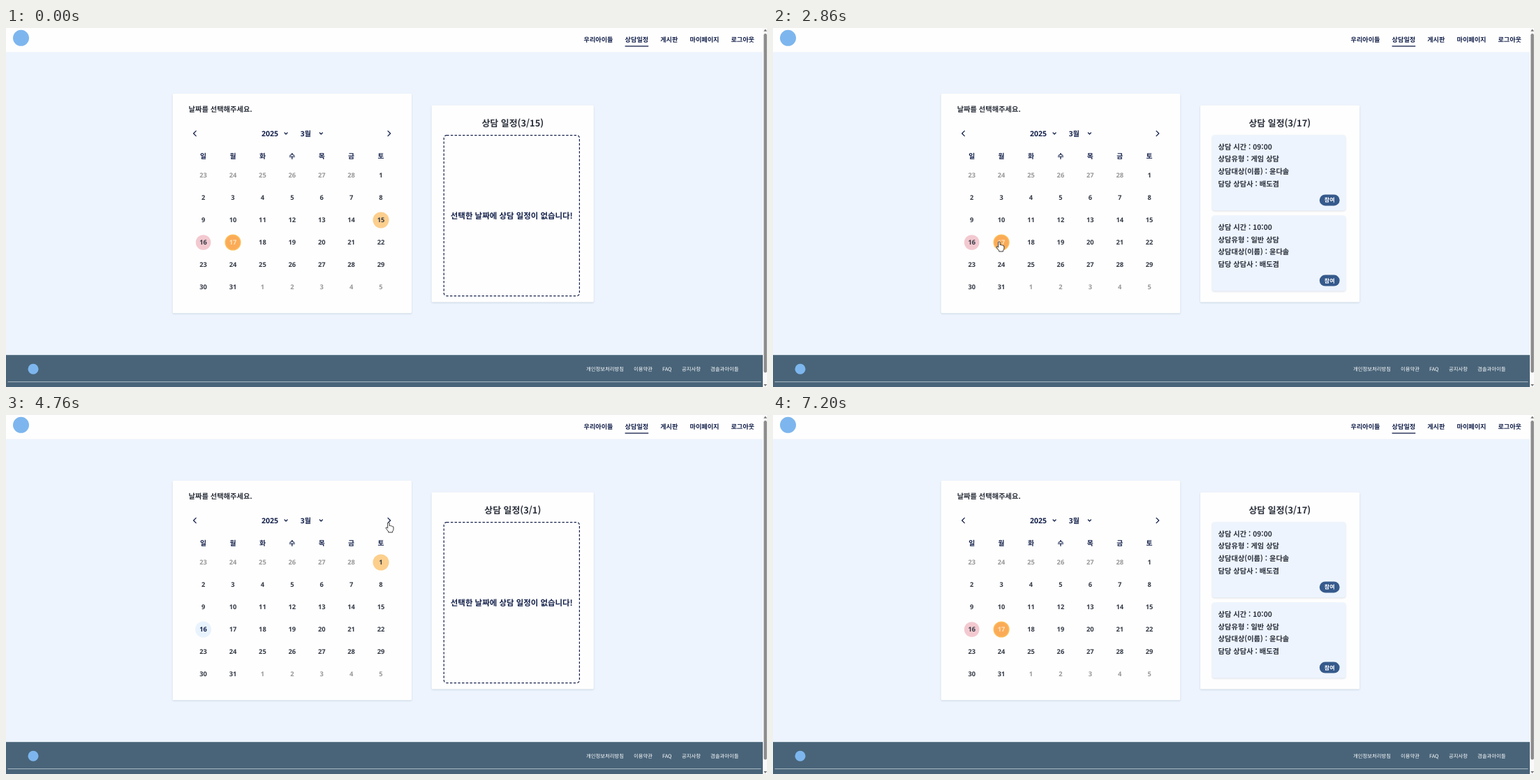
An HTML page for the animation above (7.67 s loop, 1090 by 514 pixels).

```html
<!DOCTYPE html>
<html lang="ko">
<head>
<meta charset="utf-8">
<title>상담 일정</title>
<style>
  html, body { margin: 0; width: 100%; height: 100%; overflow: hidden; background: #edf4fd; }
  svg { display: block; width: 1090px; height: 514px; }
  text { font-family: "Noto Sans CJK KR", "Noto Sans CJK", "Noto Sans", sans-serif; font-weight: 600; text-rendering: geometricPrecision; white-space: pre; }
  .num { font-family: "Noto Sans", "Noto Sans CJK KR", "Noto Sans CJK", sans-serif; font-weight: 700; }
  .thin { font-weight: 500; }
  .card { fill: #fefefe; filter: drop-shadow(0 1px 1px rgba(60, 85, 120, .2)); }
  .slot { fill: #edf4fd; filter: drop-shadow(0 1px 1px rgba(60, 85, 120, .18)); }
  .chevron { fill: none; stroke: #14214b; stroke-width: 1.3; stroke-linecap: round; stroke-linejoin: round; }
</style>
</head>
<body>
<svg viewBox="0 0 1090 514">
  <g id="page"></g>
  <g id="cursor" fill="#fff" stroke="#222" stroke-width=".9" stroke-linejoin="round">
    <path id="arrow" d="M0 0V10L2.4 7.9L4 11.3L5.6 10.5L4.1 7.3H7Z"/>
    <path id="hand" d="M-1.3 .6Q0 -1 1.2 .6V4.6Q2.4 3.8 3.4 5Q4.6 4.4 5.4 5.6Q7 5.2 7 7V9.5Q6.8 11.5 5.6 12.8V14H-.3V12.8L-3.7 8.4Q-4.2 6.6 -2.7 6.8L-1.3 8.2Z"/>
  </g>
</svg>
<script>
const LOOP = 7670;
const NAVY = '#14214b', INK = '#2b303b';
const page = document.getElementById('page');
const cursor = document.getElementById('cursor');
const arrow = document.getElementById('arrow');
const hand = document.getElementById('hand');

// start time, month, selected day
const scenes = [[0, 3, 15], [1520, 3, 16], [2200, 3, 17], [3680, 2, 1], [4690, 3, 1], [5860, 3, 17]];

// pointer tip: time, x, y
const path = [
  [140, 1008, 500], [390, 402, 308], [720, 402, 308], [920, 358, 312],
  [1179, 358, 312], [1180, 351, 304], [1320, 330, 307], [1450, 281, 309],
  [1919, 281, 309], [1920, 324, 304], [2269, 324, 304], [2270, 324, 306],
  [2860, 324, 306], [3610, 275, 149.5], [3950, 275, 149.5], [4420, 548, 154],
  [4990, 548, 154], [5720, 327, 302], [6310, 327, 302], [7070, 992, 474], [7140, 1024, 496]
];

const text = (x, y, s, size, fill = NAVY, anchor = 'start', cls = '') =>
  `<text x="${x}" y="${y + size * .37}" font-size="${size}" fill="${fill}" text-anchor="${anchor}" class="${cls}">${s}</text>`;
const rect = (x, y, w, h, attrs) => `<rect x="${x}" y="${y}" width="${w}" height="${h}" ${attrs}/>`;
const circle = (x, y, r, attrs) => `<circle cx="${x}" cy="${y}" r="${r}" ${attrs}/>`;
const line = d => `<path class="chevron" d="${d}"/>`;

function layout(month, day) {
  const feb = month === 2, list = day === 17;
  return { feb, list, dx: feb ? 4.3 : list ? 2.1 : 0, dy: feb ? 8.9 : 0 };
}

const cellX = (i, l) => 282.6 + 42.4 * (i % 7) + l.dx;
const cellY = (i, l) => 211 + 32 * Math.floor(i / 7) + l.dy;

function header(l) {
  const o = l.feb ? 8.6 : 0;
  const items = [['우리아이들', 827.5], ['상담일정', 886.6], ['게시판', 937.2], ['마이페이지', 979.5], ['로그아웃', 1038.4]];
  return rect(0, 0, 1090, 34.5, 'fill="#fefefe"') + circle(21.5, 14.3, 11.5, 'fill="#7db6ee"') +
    items.map(([s, x]) => text(x + o, 16.4, s, 9.13)).join('') +
    rect(886.6 + o, 25.4, 33.6, 1.3, `fill="${NAVY}"`);
}

function footer(l) {
  const o = l.feb ? 8.6 : 0, y = l.feb ? 454 : 468.2;
  const items = [['개인정보처리방침', 831], ['이용약관', 899], ['FAQ', 940], ['공지사항', 968], ['겸솔과아이들', 1009]];
  let s = rect(0, y, 1090, 70, 'fill="#496479"') + circle(39, y + 20, 7.5, 'fill="#7db6ee"') +
    items.map(([t, x]) => text(x + o, y + 20, t, 7.33, '#fff', 'start', 'thin')).join('') +
    rect(2.5, y + 38, 1079 + o / 2, .9, 'fill="#b9c6d0"');
  if (l.feb) {
    s += text(31, 505.8, '©2025 QK17 tolmi. All rights reserved.', 6.36, '#fff', 'start', 'thin') +
      text(958, 506, 'am 9:00 - pm 18:00', 6.36, '#fff', 'start', 'thin') +
      text(1018, 506, '059-000-0000', 6.36, '#fff', 'start', 'thin') +
      '<path d="M944 501.2L946 500.6L947.4 503L946.3 504.2Q947.2 506.3 949.3 507.3L950.4 506.1L952.8 507.5L952.3 509.4Q951.4 510 950 509.6Q945 507.7 943.6 502.8Z" fill="none" stroke="#f09a4c" stroke-width="1" stroke-linejoin="round"/>';
  }
  return s;
}

function scrollbar() {
  return rect(1084, 0, 6, 514, 'fill="#fafafa"') + rect(1085.4, 8, 4.4, 485.5, 'rx="2.2" fill="#8b8b8b"') +
    '<path d="M1085.2 4.8L1087.6 1.4L1090 4.8ZM1085.2 510L1087.6 513L1090 510Z" fill="#777"/>';
}

function calendar(month, day, l, hover, warm) {
  const { dx, dy } = l, ny = 151 + dy;
  let s = rect(238.7 + dx, 94 + dy, 342.4, l.feb ? 282 : 314.3, 'rx="1.5" class="card"') +
    text(261.6 + dx, 116 + dy, '날짜를 선택해주세요.', 10.25, INK) +
    text(366 + dx, ny, '2025', 10.5, NAVY, 'start', 'num') +
    text(421.7 + dx, ny, month + '월', 10.2, NAVY, 'start', 'num') +
    line(`M${272.2 + dx} ${ny - 3.6}l-3.6 3.6l3.6 3.6`) + line(`M${547 + dx} ${ny - 3.6}l3.6 3.6l-3.6 3.6`);
  for (const x of [401, 451.3]) s += line(`M${x + dx - 2} ${ny - 1}l2 2l2 -2`);
  [...'일월화수목금토'].forEach((d, i) => s += text(cellX(i, l), 183.6 + dy, d, 9.8, NAVY, 'middle', 'num'));

  for (let i = 0; i < (l.feb ? 35 : 42); i++) {
    const date = new Date(2025, month - 1, i - 5), n = date.getDate();
    const own = date.getMonth() === month - 1, march = own && !l.feb;
    const x = cellX(i, l), y = cellY(i, l);
    let fill = own ? '#343a46' : '#989898';
    if (march && n === 17 && warm) {
      s += circle(x, y, 10.9, 'fill="#fbab57" stroke="#fcbf5a" stroke-width="1.3"');
      fill = '#fde3bd';
    } else if (march && n === 16) {
      s += warm ? circle(x, y, 10.8, 'fill="#f3c9d0"') : circle(x, y, 11.5, 'fill="#e9f3fd"');
      if (!warm) fill = NAVY;
    } else if (own && n === day) {
      s += circle(x, y, 11.5, `fill="${n === 17 ? '#fcc878' : '#fccf8d'}"`);
      if (n === 17) fill = '#fff';
    } else if (i === hover) {
      s += circle(x, y, 11.5, 'fill="#fdcb80"');
      fill = '#fff';
    }
    s += text(x, y, n, 9.3, fill, 'middle', 'num');
  }
  return s;
}

function booking(y, time, kind) {
  const rows = ['상담 시간 : ' + time, '상담유형 : ' + kind + ' 상담', '상담대상(이름) : 윤다솔', '담당 상담사 : 배도겸'];
  return rect(629, y, 191.2, 108, 'rx="3.5" class="slot"') +
    rows.map((r, i) => text(637.6, y + 16.8 + 17.7 * i, r, 10.25, INK)).join('') +
    rect(782.8, y + 85.2, 28.8, 16, 'rx="8" fill="#365a8c"') +
    text(797.2, y + 93.3, '참여', 8, '#fff', 'middle');
}

function schedule(month, day, l) {
  const x = l.feb ? 4.3 : 0, y = l.feb ? -7.6 : 0;
  const s = rect(l.list ? 612 : 609.6 + x, 110.8 + y, l.list ? 228.2 : 232.2, 281.8, 'rx="1.5" class="card"') +
    text(725.8 + x, 136.3 + y, `상담 일정(${month}/${day})`, 12.9, INK, 'middle');
  if (l.list) return s + booking(153.2, '09:00', '게임') + booking(268.4, '10:00', '일반');
  return s + rect(627.2 + x, 153.6 + y, 194.2, 230, `rx="4" fill="none" stroke="${NAVY}" stroke-width="1.2" stroke-dasharray="3.4 2.3"`) +
    text(724.3 + x, 269.2 + y, '선택한 날짜에 상담 일정이 없습니다!', 11.45, NAVY, 'middle');
}

function pointerAt(t) {
  if (t < path[0][0] || t >= 7200) return null;
  const i = path.findIndex(p => p[0] > t);
  if (i < 0) return path[path.length - 1].slice(1);
  const [t0, x0, y0] = path[i - 1], [t1, x1, y1] = path[i];
  const k = (t - t0) / (t1 - t0), e = k * k * (3 - 2 * k);
  return [x0 + (x1 - x0) * e, y0 + (y1 - y0) * e];
}

let shown = '';
function draw(t) {
  const [, month, day] = scenes.filter(s => s[0] <= t).pop();
  const l = layout(month, day);
  const warm = t < 3680 || t >= 6330;
  const tip = pointerAt(t);
  let hover = -1;

  cursor.style.display = tip ? '' : 'none';
  if (tip) {
    const near = (x, y, r) => Math.hypot(tip[0] - x, tip[1] - y) < r;
    for (let i = 0; i < (l.feb ? 35 : 42); i++) if (near(cellX(i, l), cellY(i, l), 11.6)) hover = i;
    const press = hover >= 0 || [270.5, 549].some(x => near(x + l.dx, 151 + l.dy, 9));
    hand.style.display = press ? '' : 'none';
    arrow.style.display = press ? 'none' : '';
    cursor.setAttribute('transform', `translate(${tip[0]} ${tip[1]})`);
  }

  const key = [month, day, hover, warm].join();
  if (key === shown) return;
  shown = key;
  page.innerHTML = header(l) + calendar(month, day, l, hover, warm) + schedule(month, day, l) +
    footer(l) + (l.feb ? '' : scrollbar());
}

const start = performance.now();
function tick() {
  draw((performance.now() - start) % LOOP);
  requestAnimationFrame(tick);
}
tick();
</script>
</body>
</html>
```
